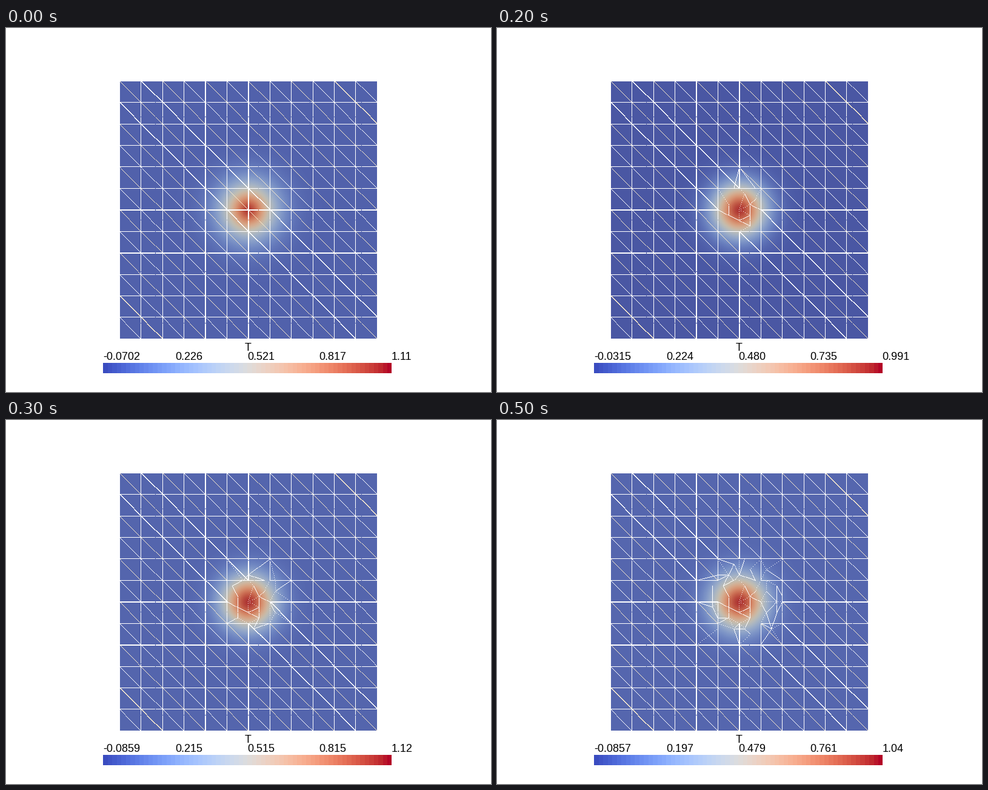
These frames come from a looping animation (800x600 px, 0.6 s). A matplotlib script:

```python
import numpy as np
import matplotlib.pyplot as plt
from matplotlib.animation import FuncAnimation
from matplotlib.tri import Triangulation

W, H, DPI = 800, 600, 100
LEFT, TOP, SIDE = 188, 88, 424
CELLS = 12
CELL = 425 / CELLS
ORIGIN = np.array([187.3, 87.3])
CENTER = ORIGIN + CELL * CELLS / 2
WHITE, CREAM = (1, 1, 1), (0.98, 0.92, 0.80)
COOLWARM = plt.get_cmap("coolwarm")

RANGES = [(-0.0702, 1.113), (-0.0223, 1.0884), (-0.0315, 0.991),
          (-0.0859, 1.1158), (-0.0226, 1.001), (-0.0857, 1.0435)]

# Refinement works in quarter cells, measured from the centre of the square.
REFINE_HUB = np.array([1.0, -0.7])
GOLDEN_ANGLE = np.pi * (3 - 5 ** 0.5)


def stroke(canvas, start, end, color=WHITE, gap=1, shift=(0, 0)):
    """Draw a hard one-pixel line, dotted when gap is above 1."""
    start, end = np.asarray(start), np.asarray(end)
    count = int(np.abs(end - start).max()) + 1
    path = start + np.linspace(0, 1, count)[:, None] * (end - start) + shift
    x, y = np.floor(path[::gap]).astype(int).T
    inside = (x >= LEFT) & (x < LEFT + SIDE) & (y >= TOP) & (y < TOP + SIDE)
    canvas[y[inside], x[inside]] = color


def paint_field(canvas, step):
    lo, hi = RANGES[step]
    y, x = np.mgrid[0:SIDE, 0:SIDE] + 0.5 - SIDE / 2
    r = np.hypot(x, y)
    width, power = (41, 1.6) if step == 0 else (42, 1.9)
    bump = 0.96 * hi * np.exp(-(r / width) ** power)
    color = COOLWARM((bump - lo) / (hi - lo))[..., :3]
    # Warm, slightly hazy light on the surface.
    lit = color * (0.78, 0.77, 0.72) + np.array([22, 19, 17]) / 255
    canvas[TOP:TOP + SIDE, LEFT:LEFT + SIDE] = lit


def paint_colorbar(canvas):
    bands = np.arange(476) * 64 // 476 / 63
    canvas[552:569, 160:636] = COOLWARM(bands)[:, :3]


def refine_radius(step):
    return 4.3 * (step / 2) ** 0.6 if step else 0


def paint_coarse(canvas, step):
    hole = refine_radius(step)

    def edge(i, j, di, dj, thick, color=WHITE):
        middle = 4 * np.array([i + di / 2 - 6, j + dj / 2 - 6])
        reach = hole if di and dj else 0.75 * hole
        if np.hypot(*(middle - REFINE_HUB)) < reach:
            return
        start = ORIGIN + CELL * np.array([i, j])
        end = start + CELL * np.array([di, dj])
        stroke(canvas, start, end, color)
        if thick:
            stroke(canvas, start, end, color, shift=(1, 0) if dj else (0, 1))

    for i in range(CELLS):
        for j in range(CELLS):
            offset = i - j
            edge(i, j, 1, 1, abs(offset) in (1, 10), WHITE if offset % 2 else CREAM)
            if j:
                edge(i, j, 1, 0, j in (6, 8))
            if i:
                edge(i, j, 0, 1, i in (4, 6))


def noise(x, y):
    """Repeatable pseudo-random value in 0..1 for a place on the mesh."""
    return np.sin(12.9 * x + 78.2 * y + 1) * 4375.8 % 1


def refined_nodes(step):
    """Snap a sunflower pattern to the quarter grid, leaving out coarse nodes."""
    radius = refine_radius(step)
    count = int((radius / 1.2) ** 2)
    k = np.arange(count)
    r, angle = 1.2 * np.sqrt(k + 0.5), k * GOLDEN_ANGLE
    snap = 2 if step == 1 else 1
    spots = REFINE_HUB + np.column_stack([r * np.cos(angle), r * np.sin(angle)])
    spots = np.unique(np.round(spots / snap) * snap, axis=0)
    return spots[(spots % 4).any(axis=1)]


def paint_refined(canvas, step):
    if step == 0:
        return
    fine = refined_nodes(step)
    grid = np.arange(-24, 25, 4)
    coarse = np.array([(x, y) for x in grid for y in grid
                       if np.hypot(x, y) < refine_radius(step) + 4])
    nodes = np.vstack([fine, coarse])
    for a, b in Triangulation(*nodes.T).edges:
        if min(a, b) >= len(fine):
            continue
        chance = noise(*(nodes[a] + nodes[b]))
        if chance > 0.55:
            continue
        is_fan = max(a, b) >= len(fine)
        gap = 3 if is_fan and chance < 0.3 or chance < 0.1 else 1
        stroke(canvas, *(CENTER + nodes[[a, b]] * CELL / 4), gap=gap)


fig = plt.figure(figsize=(W / DPI, H / DPI), dpi=DPI, facecolor="white")
ax = fig.add_axes([0, 0, 1, 1])
ax.axis("off")
picture = ax.imshow(np.ones((H, W, 3)), extent=(0, W, H, 0), interpolation="nearest")
ax.set(xlim=(0, W), ylim=(H, 0), aspect="auto")

font = dict(family="Liberation Sans", size=18 * 72 / DPI, color="black", va="baseline")
labels = [ax.text(160 + 118.9 * k, 547, "", ha="left", **font) for k in range(5)]
ax.text(399, 532, "T", ha="center", **font)


def draw(step):
    canvas = np.ones((H, W, 3))
    paint_field(canvas, step)
    paint_coarse(canvas, step)
    paint_refined(canvas, step)
    paint_colorbar(canvas)
    picture.set_data(canvas)
    for label, value in zip(labels, np.linspace(*RANGES[step], len(labels))):
        label.set_text(f"{value:#.3g}")
    return [picture, *labels]


animation = FuncAnimation(fig, draw, frames=len(RANGES), interval=100, repeat=True)
plt.show()
```
